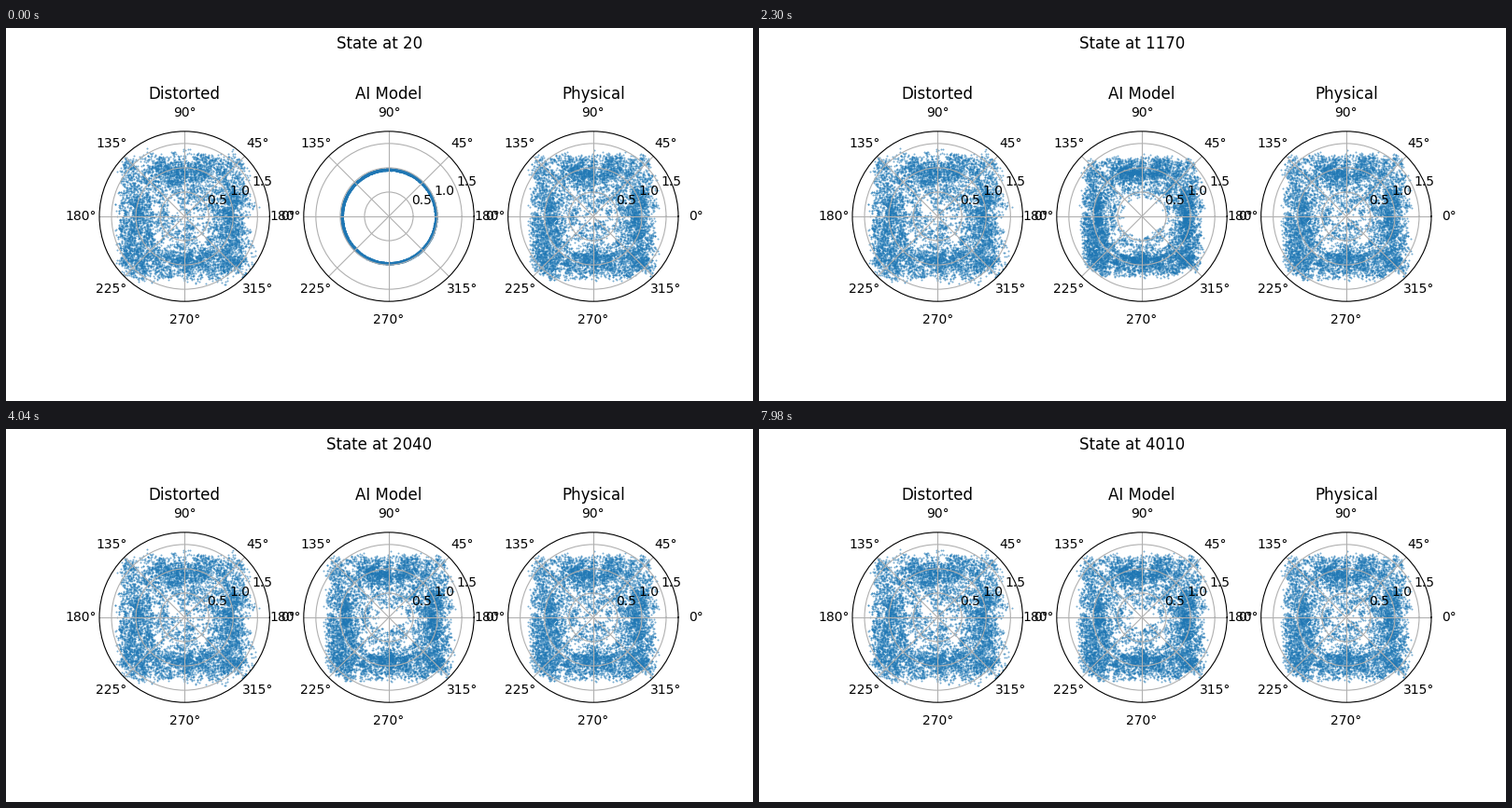
A matplotlib script that plays this animation: 800 by 400 pixels, repeating every 8000 ms.

```python
import numpy as np
import matplotlib.pyplot as plt
from matplotlib.animation import FuncAnimation
from matplotlib.lines import Line2D
from matplotlib.transforms import IdentityTransform

WIDTH, HEIGHT, DPI = 800, 400, 100
FRAMES, INTERVAL = 400, 20
RING = 0.965
CLUMP = 6                      # points per small cluster
TOP, BOTTOM = 50, 330          # rows covered by the panels
LEFT, RIGHT = 280, 540         # columns covered by the middle panel
DOT = dict(ls="none", marker="o", ms=2.0 * 72 / DPI, mew=0, color="C0",
           alpha=0.6)

rng = np.random.default_rng(7)


def rounded_square(n):
    """Centres spread over a full square with a denser band near radius 1."""
    ang = rng.uniform(0, 2 * np.pi, n)
    band = rng.normal(0.95, 0.12, n)
    fill = 0.08 + 1.18 * np.sqrt(rng.uniform(0, 1, n))
    d = np.clip(np.where(rng.random(n) < 0.3, band, fill), 0.08, 1.27)
    p = 2.5 + 6 * (d / 1.25) ** 3
    c, s = np.cos(ang), np.sin(ang)
    scale = d / (np.abs(c) ** p + np.abs(s) ** p) ** (1 / p)
    return scale * c, scale * s


def patch(n, x, y, sx, sy):
    px = np.clip(rng.normal(x, sx, n), -1.2, 1.2)
    py = np.clip(rng.normal(y, sy, n), -1.2, 1.2)
    return px, py


def scatter_clumps(x, y, spread):
    """Put a small cluster of points round each centre."""
    x, y = np.repeat(x, CLUMP), np.repeat(y, CLUMP)
    return x + rng.normal(0, spread, x.size), y + rng.normal(0, spread, y.size)


def polar(x, y):
    return np.arctan2(y, x), np.clip(np.hypot(x, y), 0.05, 1.72)


parts = [
    rounded_square(1130),
    patch(75, -0.1, 0.86, 0.4, 0.11),
    patch(60, -0.95, -0.85, 0.16, 0.18),
    patch(60, 0.92, -0.9, 0.17, 0.15),
    patch(40, -0.88, -0.25, 0.12, 0.3),
    patch(40, 0.92, -0.1, 0.06, 0.4),
    patch(45, 0.0, -0.9, 0.5, 0.1),
]
cx, cy = np.hstack(parts)
px, py = scatter_clumps(cx, cy, 0.045)
theta, radius = polar(px, py)
shift = rng.normal(0, 0.06, (2, cx.size))
dx, dy = scatter_clumps(1.04 * cx + shift[0], cy + shift[1], 0.045)
start = RING + rng.normal(0, 0.006, radius.size)

fig, axes = plt.subplots(1, 3, figsize=(WIDTH / DPI, HEIGHT / DPI), dpi=DPI,
                         subplot_kw={"projection": "polar"})
for ax, name in zip(axes, ("Distorted", "AI Model", "Physical")):
    ax.set_title(name)
    ax.set_ylim(0, 1.75)
    ax.set_yticks([0.5, 1.0, 1.5])
    ax.patch.set_visible(False)
axes[0].plot(*polar(dx, dy), zorder=1, **DOT)
axes[2].plot(theta, radius, zorder=1, **DOT)


def snapshot(*shown):
    """Render the chosen panels once on a clear ground."""
    for ax in axes:
        ax.set_visible(ax in shown)
    fig.canvas.draw()
    return np.array(fig.canvas.buffer_rgba())[TOP:BOTTOM]


# The panels never change, so they are drawn once and reused as layers.
fig.patch.set_visible(False)
outer = snapshot(axes[0], axes[2])
middle = snapshot(axes[1])[:, LEFT:RIGHT]
fig.patch.set_visible(True)

center = axes[1].transData.transform((0, 0))
unit = axes[1].transData.transform((0, 1))[0] - center[0]
for ax in axes:
    ax.remove()

fig.figimage(outer, 0, HEIGHT - BOTTOM, zorder=1)
fig.figimage(middle, LEFT, HEIGHT - BOTTOM, zorder=3)
dots = fig.add_artist(Line2D([], [], transform=IdentityTransform(),
                             zorder=2, **DOT))
title = fig.suptitle("")

STEPS = [20, 400, 770, 1170, 1640, 2040, 4010]
GROW_OUT = [0, 0.28, 0.58, 0.84, 0.95, 1.0, 1.0]
GROW_IN = [0, 0.25, 0.5, 0.65, 0.79, 0.86, 0.88]


def update(frame):
    step = 20 + 10 * frame
    grow = np.where(radius > RING, np.interp(step, STEPS, GROW_OUT),
                    np.interp(step, STEPS, GROW_IN))
    r = unit * (start + (radius - start) * grow)
    dots.set_data(center[0] + r * np.cos(theta), center[1] + r * np.sin(theta))
    title.set_text(f"State at {step}")
    return dots, title


anim = FuncAnimation(fig, update, frames=FRAMES, interval=INTERVAL,
                     repeat=True, repeat_delay=0, cache_frame_data=False)
plt.show()
```
